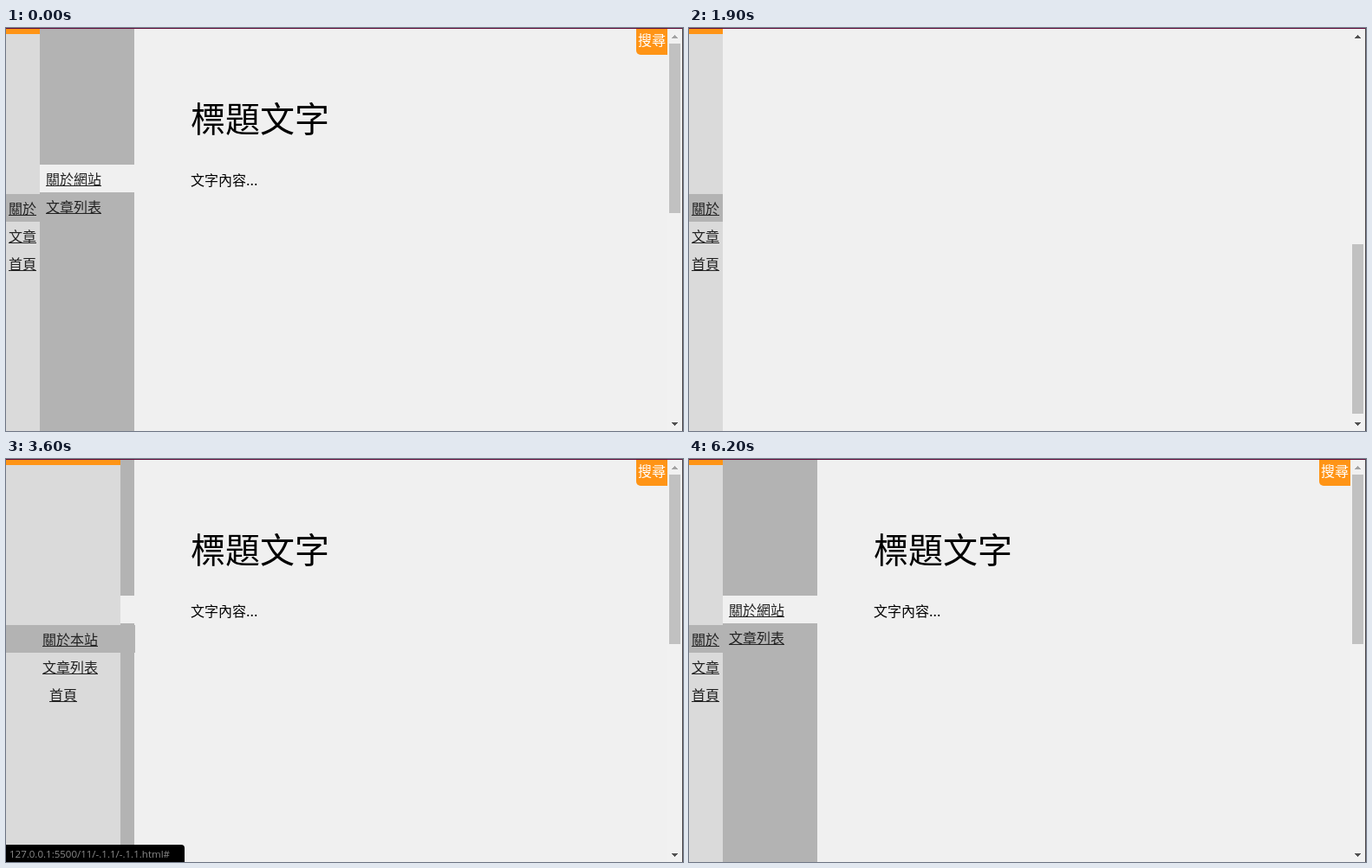
Animation of 781 by 466 pixels, one loop 6.9 s. Source, as an HTML page with a canvas:

```html
<!DOCTYPE html>
<html lang="zh-TW">
<head>
<meta charset="utf-8">
<title>側邊選單</title>
<style>
  html, body { margin: 0; width: 100%; height: 100%; overflow: hidden; background: #f0f0f0; }
  canvas { display: block; }
</style>
</head>
<body>
<canvas id="stage" width="781" height="466"></canvas>
<script>
const ctx = document.getElementById('stage').getContext('2d');
const W = 781, H = 466, LOOP = 6900, STEP = 100;
const MAX_SCROLL = 559;
const PAGE = '#f0f0f0', COLUMN = '#b3b3b3', SIDE = '#dadada', ORANGE = '#ff9416', INK = '#222';
const CJK = '"Noto Sans CJK TC", "Noto Sans CJK", sans-serif';
const LINK = '127.0.0.1:5500/11/-.1.1/-.1.1.html';

// Wheel gestures; overlapping ones add up.
const gestures = [
  { start: 548, time: 161, by: 100 },
  { start: 1165, time: 500, by: 459 },
  { start: 1890, time: 110, by: -359 },
  { start: 1957, time: 280, by: -100 },
  { start: 2549, time: 161, by: -100 }
];

function ease(t, start, time) {
  const x = Math.min(1, Math.max(0, (t - start) / time));
  return x * x * (3 - 2 * x);
}

// Rises from one moment and falls again from a later one.
function pulse(t, rise, riseTime, fall, fallTime) {
  return ease(t, rise, riseTime) - ease(t, fall, fallTime);
}

function scrollAt(t) {
  return Math.round(gestures.reduce((sum, g) => sum + g.by * ease(t, g.start, g.time), 0));
}

function hoveredRow(t) {
  if (t < 4000 || t >= 4500) return 0;
  return t < 4100 ? 1 : 2;
}

function rect(x, y, w, h, color) {
  ctx.fillStyle = color;
  ctx.fillRect(x, y, w, h);
}

function text(str, x, y, font, color) {
  ctx.font = font;
  ctx.fillStyle = color;
  ctx.fillText(str, x, y);
}

function link(str, x, y) {
  text(str, x, y, `16px ${CJK}`, INK);
  rect(x, y + 1, str.length * 16, 1, INK);
}

function clipped(x, y, w, h, draw) {
  ctx.save();
  ctx.beginPath();
  ctx.rect(x, y, w, h);
  ctx.clip();
  draw();
  ctx.restore();
}

function faded(alpha, draw) {
  ctx.save();
  ctx.globalAlpha = alpha;
  draw();
  ctx.restore();
}

function rounded(x, y, w, h, radii, color) {
  ctx.fillStyle = color;
  ctx.beginPath();
  ctx.roundRect(x, y, w, h, radii);
  ctx.fill();
}

function drawPage(scroll, listHover) {
  ctx.save();
  ctx.translate(0, -scroll);
  rect(39, 0, 109, 467, COLUMN);
  rect(39, 158, 109, 32, PAGE);
  faded(listHover, () => rect(39, 190, 109, 32, PAGE));
  link('關於網站', 46, 181);
  link('文章列表', 46, 213);
  text('標題文字', 213, 120, `40px ${CJK}`, '#000');
  text('文字內容...', 213, 182, `16px ${CJK}`, '#000');
  rounded(727, 0, 36, 31, [0, 0, 0, 5], ORANGE);
  text('搜尋', 729, 20, `500 16px ${CJK}`, '#fff');
  ctx.restore();
}

// Triangle made of one-pixel rows, its tip at y.
function arrow(y, dir, active) {
  for (let i = 0; i < 4; i++)
    rect(771 - i, y + dir * i, 1 + 2 * i, 1, active ? '#505050' : '#a3a3a3');
}

function drawScrollbar(scroll) {
  rect(763, 1, 17, H - 1, '#f1f1f1');
  rect(765, 18 + Math.round(scroll * 196 / H), 13, 196, '#c1c1c1');
  arrow(8, 1, scroll > 0);
  arrow(459, -1, scroll < MAX_SCROLL);
}

function drawSidebar(open, hover) {
  const width = Math.round(39 + 93 * open);
  rect(0, 0, width, H, SIDE);
  rect(0, 0, width, 7, ORANGE);
  [['關於', '本站'], ['文章', '列表'], ['首頁', '']].forEach(([head, tail], i) => {
    const y = 192 + 32 * i;
    const rowWidth = Math.round(width + (tail ? 17 * open : 0));
    const label = 32 + (tail ? 32 * open : 0);
    const x = Math.floor((rowWidth - label) / 2);
    if (i === 0 || i === hover) rect(0, y, rowWidth, 32, COLUMN);
    clipped(x, y, label, 32, () => link(head + tail, x, y + 23));
  });
}

function drawStatus(alpha, str, width) {
  faded(alpha, () => {
    rounded(0, 446, width, 20, [0, 4, 0, 0], '#000');
    text(str, 4, 461, '11.5px "Open Sans", "Noto Sans", sans-serif', '#8a8a8a');
  });
}

function draw(t) {
  const scroll = scrollAt(t);
  rect(0, 0, W, H, PAGE);
  drawPage(scroll, pulse(t, 5150, 250, 5650, 250));
  drawScrollbar(scroll);
  drawSidebar(pulse(t, 3250, 320, 4750, 250), hoveredRow(t));
  drawStatus(pulse(t, 3440, 160, 4750, 250), LINK + '#', 206);
  drawStatus(pulse(t, 5550, 150, 6050, 150), LINK, 199);
  rect(0, 0, W, 1, '#640d3c');
  rect(780, 0, 1, H, '#4a4548');
}

const began = performance.now();
function tick() {
  const t = (performance.now() - began) % LOOP;
  draw(Math.floor(t / STEP) * STEP);
  requestAnimationFrame(tick);
}
tick();
</script>
</body>
</html>
```
